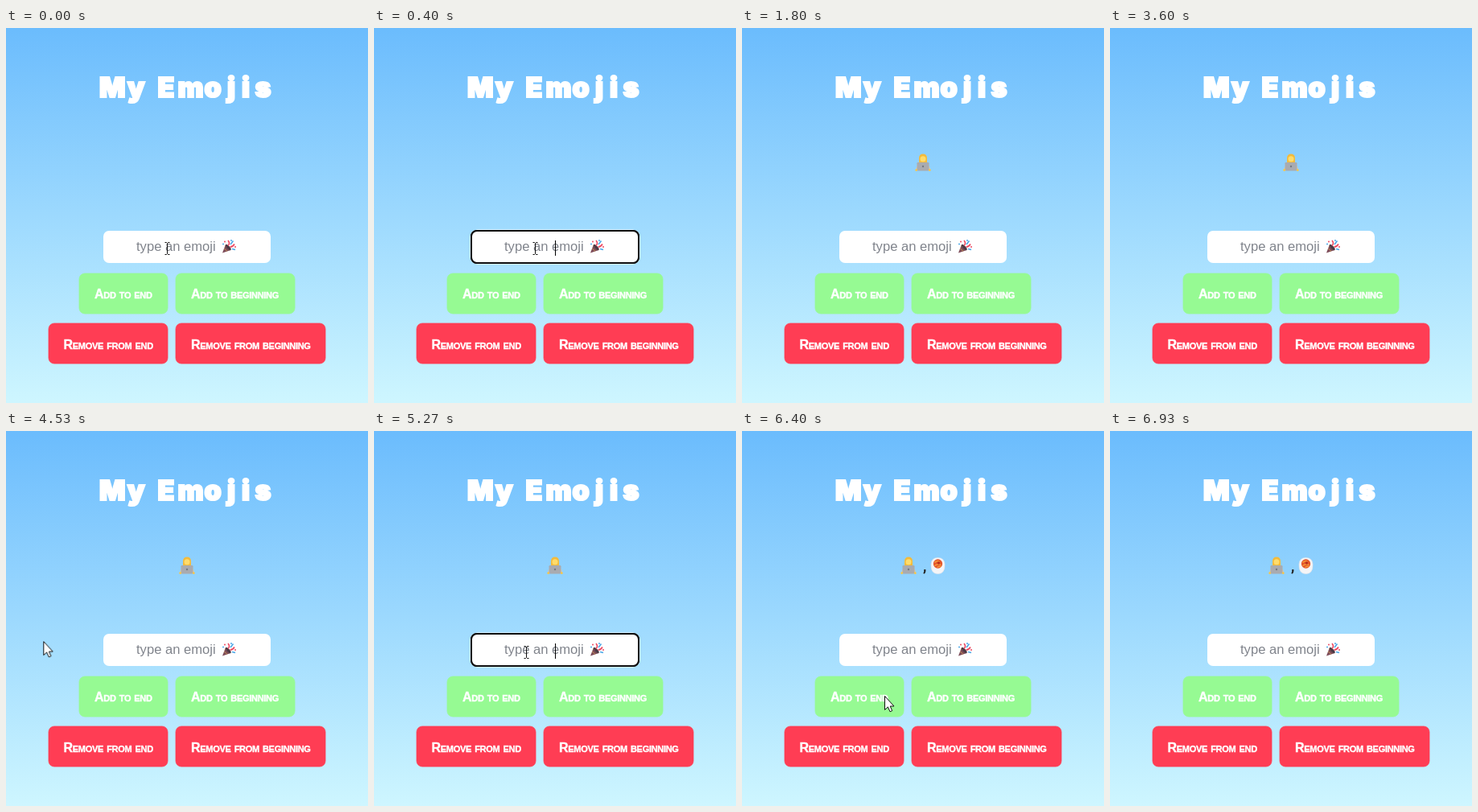
Write an HTML page that moves like this. It is 450 px wide and 466 px high and loops after 8 s.

```html
<!DOCTYPE html>
<html lang="en">
<head>
<meta charset="utf-8">
<title>My Emojis</title>
<style>
html, body { margin: 0; width: 100%; height: 100%; overflow: hidden; }
svg { display: block; width: 450px; height: 466px; }

.title { font: 900 34px Inter, sans-serif; fill: #fff; stroke: #fff; stroke-width: 2.2; }
.label { font: 700 16px "Liberation Sans", Arial, sans-serif; font-variant: small-caps; letter-spacing: -.3px; fill: #fff; stroke: #fff; stroke-width: .4; }
.hint { font: 16.6px "Liberation Sans", Arial, sans-serif; fill: #80848c; }
.comma { font: 700 18px Roboto, sans-serif; fill: #222; }
.add { fill: #96fa93; stroke: #96fa93; stroke-width: .8; }
.remove { fill: #ff3d54; stroke: #ff3d54; stroke-width: .8; }
.caret { fill: #000; }

/* Hard switches share one 8 s clock; 1% is 80 ms */
.sw { animation: 8s step-end infinite; }
.placeholder { animation-name: placeholder; }
.ring { animation-name: ring; }
.typed-a { animation-name: typed-a; }
.typed-b { animation-name: typed-b; }
.caret-empty { animation-name: caret-empty; }
.caret-typed { animation-name: caret-typed; }
.list-one { animation-name: list-one; }
.list-two { animation-name: list-two; }
.pointer { animation-name: pointer; }
.arrow { animation-name: arrow; }
.beam { animation-name: beam; }
.path { animation: path 8s linear infinite; }

@keyframes placeholder {
  0%, 20.8%, 80% { opacity: 1; }
  6.25%, 67.5% { opacity: 0; }
  100% { opacity: 1; }
}
@keyframes ring {
  0%, 16.6%, 75.9% { opacity: 0; }
  3.4%, 60.8% { opacity: 1; }
  100% { opacity: 0; }
}
@keyframes typed-a {
  0%, 20.8% { opacity: 0; }
  6.25% { opacity: 1; }
  100% { opacity: 0; }
}
@keyframes typed-b {
  0%, 80% { opacity: 0; }
  67.5% { opacity: 1; }
  100% { opacity: 0; }
}
@keyframes caret-empty {
  0%, 6.25%, 67.4% { opacity: 0; }
  3.4%, 60.8% { opacity: 1; }
  100% { opacity: 0; }
}
@keyframes caret-typed {
  0%, 12.9%, 74.2% { opacity: 0; }
  6.25%, 67.5% { opacity: 1; }
  100% { opacity: 0; }
}
@keyframes list-one {
  0%, 80% { opacity: 0; }
  20.8% { opacity: 1; }
  100% { opacity: 0; }
}
@keyframes list-two {
  0% { opacity: 0; }
  80%, 100% { opacity: 1; }
}
@keyframes pointer {
  0%, 50.8% { opacity: 1; }
  22.4%, 86.5% { opacity: 0; }
  100% { opacity: 0; }
}
@keyframes beam {
  0%, 58.8% { opacity: 1; }
  9.3%, 70% { opacity: 0; }
  100% { opacity: 0; }
}
@keyframes arrow {
  0%, 58.8% { opacity: 0; }
  9.3%, 70% { opacity: 1; }
  100% { opacity: 1; }
}
@keyframes path {
  0%, 6.9% { transform: translate(201px, 274px); }
  10.875% { transform: translate(184px, 305px); }
  11.625%, 14% { transform: translate(155px, 321px); }
  19.1%, 22.4% { transform: translate(162px, 335px); }
  50.8% { transform: translate(0, 243px); }
  56.6% { transform: translate(45px, 262px); }
  60.8%, 68.75% { transform: translate(190px, 275px); }
  72.5%, 82.5% { transform: translate(177px, 330px); }
  86.4%, 100% { transform: translate(99px, 322px); }
}
</style>
</head>
<body>
<svg viewBox="0 0 450 466" xmlns="http://www.w3.org/2000/svg">
  <defs>
    <linearGradient id="sky" x2="0" y2="1">
      <stop stop-color="#6bbcfd"/>
      <stop offset="1" stop-color="#cef6ff"/>
    </linearGradient>

    <g id="coder">
      <path d="M-5 1V-5Q-5-10.5 0-10.5T5-5V1Z" fill="#f2bb3d"/>
      <circle cy="-4.2" r="3.5" fill="#ffdc6b"/>
      <path d="M-9 10Q-8 1 0 .5T9 10Z" fill="#e6c79a"/>
      <rect x="-7.5" y="0" width="15" height="10.5" rx="1.2" fill="#a9abb0"/>
      <circle cy="5" r="1.2" fill="#777a82"/>
      <circle cx="-8.3" cy="9.6" r="1.4" fill="#f7c548"/>
      <circle cx="8.3" cy="9.6" r="1.4" fill="#f7c548"/>
    </g>

    <g id="bowl">
      <path d="M-8.5-2Q-8-10 0-10T8.5-2Q9 10 0 10T-8.5-2Z" fill="#f5f5f7" stroke="#e3e5ea" stroke-width=".6"/>
      <circle cy="-2.5" r="5.7" fill="#e4572c"/>
      <path d="M-4-4Q-1-7 2-5M-4 0Q0-3 4-1M-1 2Q2 0 4 1" fill="none" stroke="#f7a23b" stroke-width="1.2"/>
      <circle cx="1" cy="-3.5" r="1.7" fill="#b92f20"/>
    </g>

    <g id="popper">
      <path d="M1 17L5 6.5L11.5 13.5Z" fill="#7d4b58"/>
      <path d="M3.2 11.5L7 15M4.5 8L10 13.2" stroke="#c99a5a"/>
      <ellipse cx="8.3" cy="10" rx="1.7" ry="4.6" transform="rotate(-43 8.3 10)" fill="#4a3945"/>
      <path d="M8 8Q11 5 8 1.5M10.5 9.5Q14 9.5 16 6" fill="none" stroke="#ee4a62" stroke-width="1.6"/>
      <path d="M11 6.5L14.5 2M13 12L17 13" stroke="#4aa8e8" stroke-width="1.6"/>
      <g fill="#ee4a62"><circle cx="4" cy="3" r="1"/><circle cx="17" cy="9.5" r="1"/></g>
      <g fill="#4aa8e8"><circle cx="2" cy="6" r="1"/><circle cx="12" cy="1.5" r="1"/></g>
    </g>
  </defs>

  <rect width="450" height="466" fill="url(#sky)"/>
  <text class="title" x="116 151 176 188.5 213.5 246.5 275 293 309.5" y="86.3">My Emojis</text>

  <use class="sw list-one" href="#coder" x="225" y="167"/>
  <g class="sw list-two">
    <use href="#coder" x="207" y="167"/>
    <text class="comma" x="225" y="174">,</text>
    <use href="#bowl" x="243.5" y="167.5"/>
  </g>

  <g class="sw ring">
    <rect x="119.5" y="250.5" width="211" height="43" rx="9" fill="#fff"/>
    <rect x="120" y="251" width="210" height="42" rx="8" fill="#101010"/>
  </g>
  <rect x="121" y="252" width="208" height="40" rx="7" fill="#fff"/>
  <rect class="sw ring" x="121" y="252" width="208" height="40" rx="7" fill="#fff" stroke="#101010" stroke-width="2"/>
  <g class="sw placeholder">
    <text class="hint" x="162" y="277">type an emoji</text>
    <use href="#popper" x="268" y="262.5"/>
  </g>
  <g class="sw typed-a"><use href="#coder" transform="translate(222.5 272.5) scale(.83)"/></g>
  <g class="sw typed-b"><use href="#bowl" transform="translate(222.5 274) scale(.83)"/></g>
  <rect class="sw caret caret-empty" x="225" y="264" width="1" height="19"/>
  <rect class="sw caret caret-typed" x="239" y="264" width="1" height="19"/>

  <g class="add">
    <rect x="91" y="305" width="110" height="50" rx="7"/>
    <rect x="211" y="305" width="148" height="50" rx="7"/>
  </g>
  <g class="remove">
    <rect x="53" y="367" width="148" height="50" rx="7"/>
    <rect x="211" y="367" width="186" height="50" rx="7"/>
  </g>
  <g class="label">
    <text x="110" y="335.5">Add to end</text>
    <text x="230" y="335.5">Add to beginning</text>
    <text x="71.5" y="398.5">Remove from end</text>
    <text x="230" y="398.5">Remove from beginning</text>
  </g>

  <g class="sw pointer">
    <g class="path">
      <path class="sw arrow" d="M.5-.5V16.5L4.4 12.9L7 18.8L9.7 17.6L7.2 12H12Z" fill="#fff" stroke="#111"/>
      <path class="sw beam" d="M-3.5-7.5H-1.5L-.5-6.5L.5-7.5H2.5M-.5-6.5V6.5M-3.5 7.5H-1.5L-.5 6.5L.5 7.5H2.5" fill="none" stroke="#111"/>
    </g>
  </g>
</svg>
</body>
</html>
```
